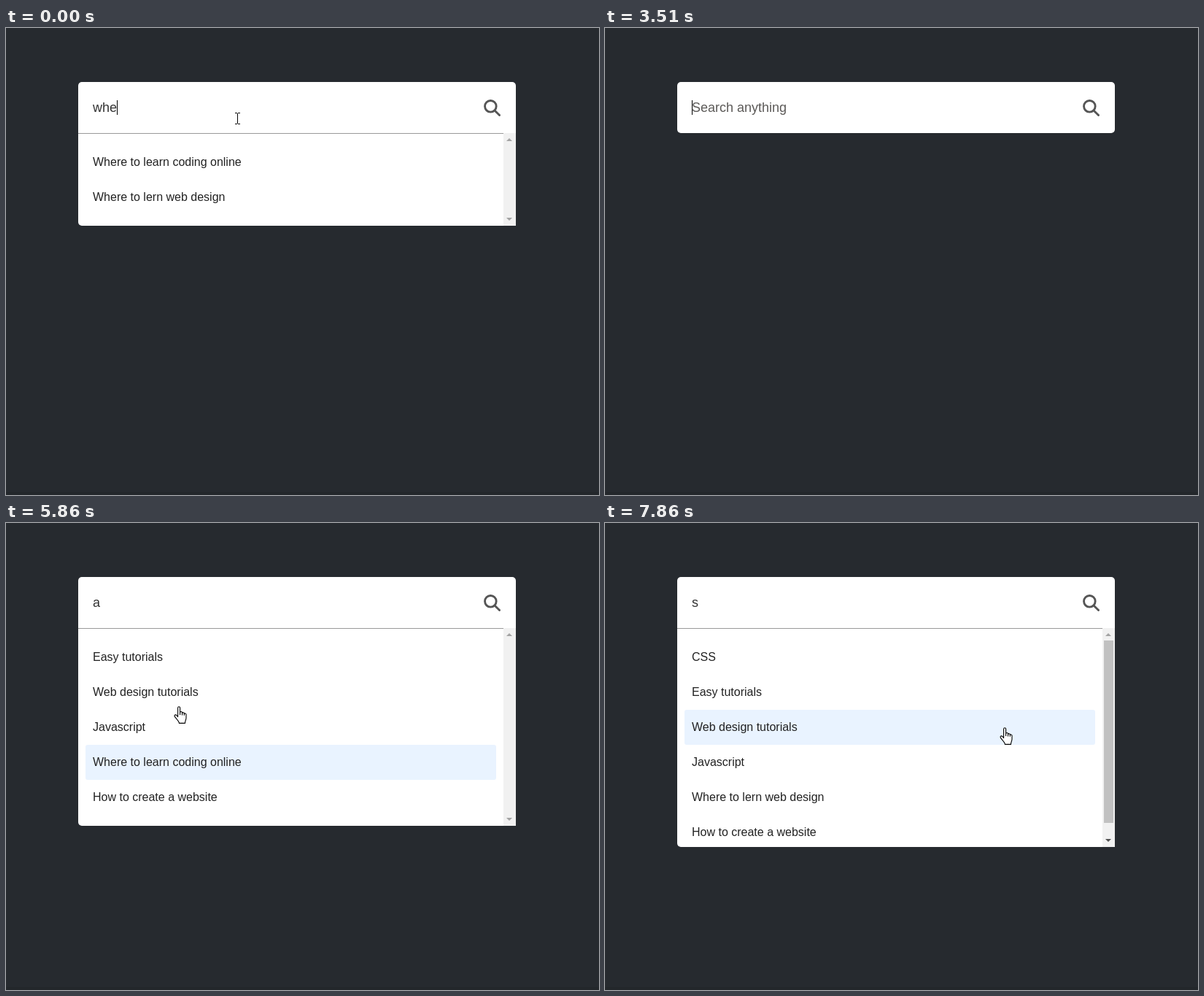
These frames come from a looping animation (813x640 px, 8 s). An HTML page:

```html
<!DOCTYPE html>
<html lang="en">
<head>
<meta charset="utf-8">
<title>Search suggestions</title>
<style>
  html, body { margin: 0; width: 100%; height: 100%; overflow: hidden; background: #262a2f; }
  body { position: relative; font-family: "Liberation Sans", Arial, sans-serif; cursor: default; }
  body > *, #bar, #bar * { position: absolute; }
  #floor { left: 0; top: 636px; width: 100%; height: 4px; background: #23272b; }
  #box { left: 99px; top: 74px; width: 600px; height: 70px; background: #fff; border-radius: 5px; }
  #box.open { border-radius: 5px 5px 0 0; }
  #field { left: 119px; top: 99px; font-size: 18px; line-height: 20px; white-space: pre; color: #333; }
  #field.empty { color: #5c5a58; }
  #caret { display: inline-block; width: 1px; height: 20px; margin-right: -1px; vertical-align: top; background: #000; }
  .picked { display: inline-block; height: 20px; background: #3390ff; color: #fff; }
  #list { left: 99px; top: 144px; width: 600px; max-height: 300px; box-sizing: border-box; overflow: hidden;
    padding: 16px 27px 15px 10px; background: #fff; border-radius: 0 0 0 5px; }
  #list::before { content: ""; position: absolute; left: 0; top: 0; width: 583px; height: 1px; background: #999; }
  .row { height: 18px; padding: 15px 10px; font-size: 16px; line-height: 18px; white-space: pre; color: #222; border-radius: 3px; }
  .row.on { background: #e9f3ff; }
  #bar { right: 0; top: 0; bottom: 0; width: 17px; background: #f1f1f1; }
  #bar i { left: 4px; border: 4px solid transparent; border-top-width: 0; border-bottom-color: #a3a3a3; }
  #up { top: 7px; }
  #down { bottom: 7px; transform: scaleY(-1); }
  #thumb { left: 2px; top: 17px; width: 13px; height: 250px; background: #c1c1c1; }
  #bar:not(.full) #thumb { display: none; }
  #bar.full #down { border-bottom-color: #505050; }
  svg { overflow: visible; }
  #lens { left: 655px; top: 97.5px; }
  #pointer { left: 0; top: 0; }
</style>
</head>
<body>
<div id="floor"></div>
<div id="box"></div>
<div id="field"></div>
<svg id="lens" width="23" height="23" viewBox="0 0 512 512" fill="none" stroke="#555" stroke-width="64">
  <circle cx="208" cy="208" r="174"/>
  <path d="M332 332L480 480" stroke-linecap="round"/>
</svg>
<div id="list">
  <div id="rows"></div>
  <div id="bar"><i id="up"></i><i id="down"></i><b id="thumb"></b></div>
</div>
<svg id="pointer" width="1" height="1">
  <g id="beam" stroke="#000" fill="none"><path d="M0 .5H3M4 .5H7M3.5 1V15M0 15.5H3M4 15.5H7"/></g>
  <g id="arrow" stroke="#000" fill="#fff"><path d="M.5 .8V16.4L4.1 13L6.6 18.6L9 17.6L6.5 12.1H11.6Z"/></g>
  <g id="hand" stroke="#000" fill="#fff" stroke-width="1.1" stroke-linejoin="round">
    <path d="M5.6 14.6V2.4C5.6 .1 8.6 .1 8.6 2.4V8.6C8.7 7.1 11.5 7.2 11.5 8.9V9.6C11.7 8.2 14.3 8.4 14.3 10V10.7C14.6 9.5 17 9.7 17 11.4V16C17 19 15.4 20 15.4 23.4H7.4C7.4 20.5 3.4 17.5 1.4 14.4C.2 12.2 2.6 11 4 12.7Z"/>
    <path d="M8.6 8.6V12M11.5 9.5V12.4M14.3 10.5V12.8" fill="none"/>
  </g>
</svg>
<script>
const LOOP = 8000;
const topics = ["CSS", "Easy tutorials", "Web design tutorials", "Javascript",
  "Where to learn coding online", "Where to lern web design", "How to create a website"];
const el = id => document.getElementById(id);

// text: field content, query: what the list is filtered by, row: hovered item, at: pointer kind and place
const typed = text => ({ text, query: text, caret: true, picked: false });
const steps = [
  [0, { ...typed("whe"), row: 0, at: ["beam", 314, 116] }],
  [120, typed("wher")],
  [260, typed("where")],
  [800, { caret: false, at: ["arrow", 297, 148] }],
  [930, { row: 1, at: ["hand", 258, 180] }],
  [1050, { at: ["hand", 238, 197] }],
  [1470, { text: topics[4] }],
  [1620, { at: ["hand", 268, 169] }],
  [1780, { row: 0, at: ["arrow", 327, 139] }],
  [1910, { at: ["beam", 393, 104] }],
  [2200, { caret: true }],
  [2730, { picked: true, caret: false, at: null }],
  [3510, typed("")],
  [4060, { caret: false }],
  [4220, typed("a")],
  [4370, { row: 1, at: ["hand", 244, 164] }],
  [4530, { at: ["hand", 247, 170] }],
  [4650, { caret: false, at: ["hand", 248, 173] }],
  [5180, { caret: true, at: ["hand", 247, 190] }],
  [5310, { row: 2, at: ["hand", 243, 248] }],
  [5440, { row: 3, at: ["hand", 239, 305] }],
  [5580, { row: 4, at: ["hand", 237, 350] }],
  [5710, { row: 5, caret: false, at: ["hand", 236, 384] }],
  [5860, { row: 4, at: ["hand", 230, 251] }],
  [6000, { row: 2, at: ["hand", 222, 172] }],
  [6130, { row: 0, at: ["beam", 213, 112] }],
  [6260, { picked: true, at: ["beam", 210, 88] }],
  [6780, { text: "", picked: false }],
  [6910, typed("")],
  [7030, typed("s")],
  [7410, { at: ["beam", 223, 106] }],
  [7560, { row: 1, caret: false, at: ["hand", 375, 220] }],
  [7710, { row: 3, at: ["hand", 514, 285] }],
  [7860, { at: ["hand", 541, 280] }]
];

function drawField({ text, caret, picked }) {
  const bar = caret ? '<span id="caret"></span>' : "";
  const body = picked ? `<span class="picked">${text}</span>` : text;
  el("field").className = text ? "" : "empty";
  el("field").innerHTML = text ? body + bar : bar + "Search anything";
}

function drawList({ query, row }) {
  const found = query ? topics.filter(t => t.toLowerCase().includes(query)) : [];
  el("box").className = query ? "open" : "";
  el("list").style.display = query ? "block" : "none";
  el("bar").className = found.length > 5 ? "full" : "";
  el("rows").innerHTML = found.map((t, i) => `<div class="row${i + 1 === row ? " on" : ""}">${t}</div>`).join("");
}

function drawPointer({ at }) {
  const [kind, x, y] = at || [];
  for (const id of ["beam", "arrow", "hand"]) el(id).style.display = id === kind ? "inline" : "none";
  if (at) el(kind).setAttribute("transform", `translate(${x} ${y})`);
}

let shown = 0;
const start = performance.now();
function tick() {
  const t = (performance.now() - start) % LOOP;
  const past = steps.filter(([from]) => from <= t);
  if (past.length !== shown) {
    shown = past.length;
    const state = Object.assign({}, ...past.map(([, change]) => change));
    drawField(state);
    drawList(state);
    drawPointer(state);
  }
  requestAnimationFrame(tick);
}
tick();
</script>
</body>
</html>
```
